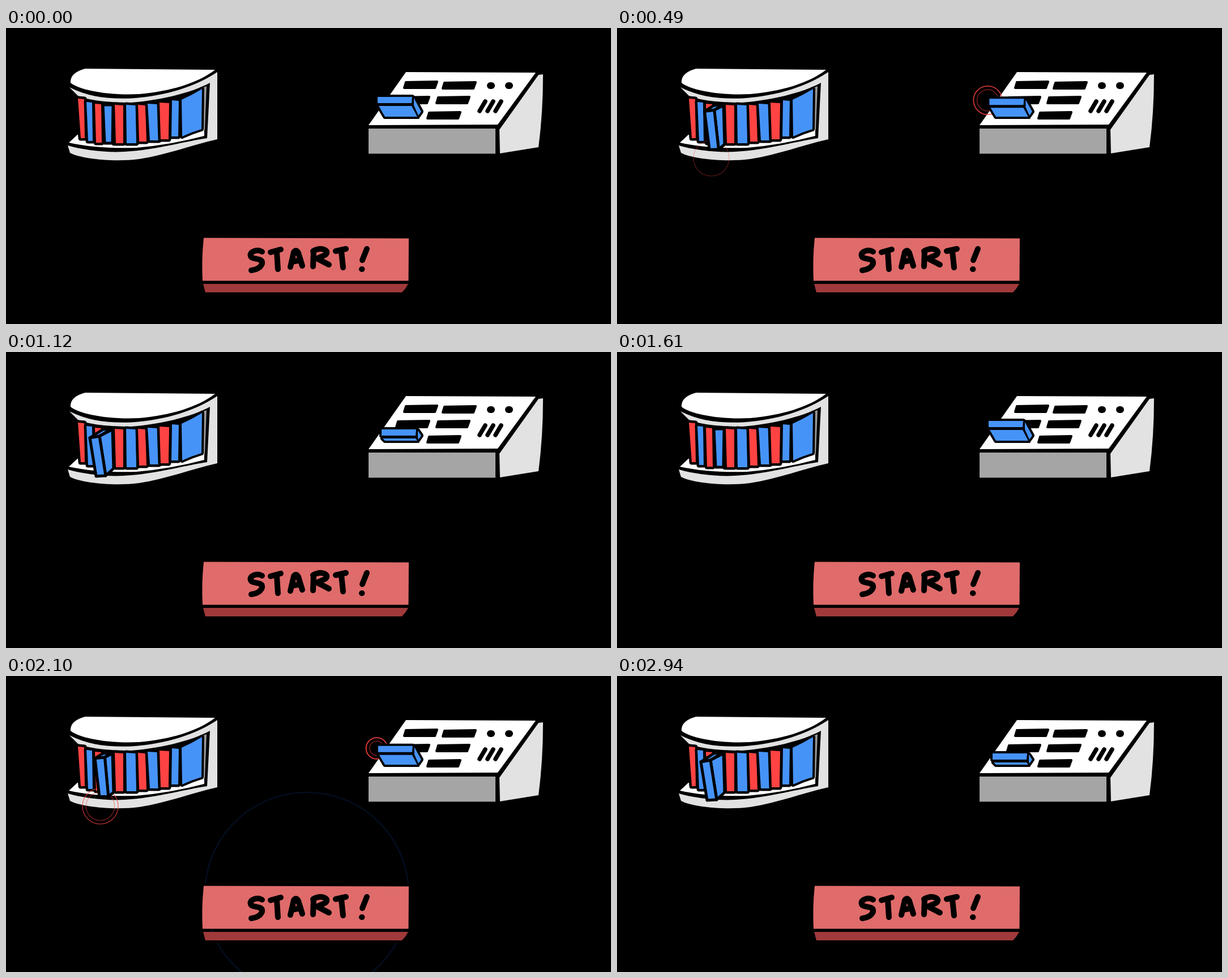
These frames come from a looping animation (1068x524 px, 2.97 s). An HTML page with a canvas:

```html
<!DOCTYPE html>
<html lang="en">
<head>
<meta charset="utf-8">
<title>Start</title>
<style>
html, body { margin: 0; width: 100%; height: 100%; overflow: hidden; background: #000; }
canvas { display: block; width: 100%; height: 100%; }
</style>
</head>
<body>
<canvas width="1068" height="524"></canvas>
<script>
const ctx = document.querySelector('canvas').getContext('2d');
const LOOP = 2970, STEP = 70, SECOND = 1610;
const RED = '#ff4343', BLUE = '#4693f8', GREY = '#e2e2e2';
ctx.lineJoin = ctx.lineCap = 'round';

const clamp = v => Math.max(0, Math.min(1, v));
const mix = (a, b, k) => a.map((v, i) => v + (b[i] - v) * k);

function fill(d, color) {
  ctx.fillStyle = color;
  ctx.fill(new Path2D(d));
}

function line(d, width, color = '#000') {
  ctx.strokeStyle = color;
  ctx.lineWidth = width;
  ctx.stroke(new Path2D(d));
}

function poly(points) {
  return 'M' + points.map(p => p.join()).join('L') + 'Z';
}

// An outline below the fill keeps the full coloured area visible.
function outlined(d, color, width) {
  line(d, width);
  fill(d, color);
}

function face(points, color) {
  const d = poly(points);
  fill(d, color);
  line(d, 5);
}

function ring(x, y, r, width, color, alpha = 1) {
  ctx.globalAlpha = alpha;
  ctx.strokeStyle = color;
  ctx.lineWidth = width;
  ctx.beginPath();
  ctx.arc(x, y, r, 0, 7);
  ctx.stroke();
  ctx.globalAlpha = 1;
}

function ripple(x, y, age) {
  for (const [lag, alpha] of [[0, 0.9], [70, 0.4]]) {
    const r = (age - lag) * 6.3 / 70;
    if (r > 0 && r < 33) ring(x, y, r, 0.9 + Math.sin(Math.PI * r / 33), RED, alpha);
  }
}

// top left x, top right x, bottom left x, bottom right x, top y, bottom y
const books = [
  [127, 138, 132, 139, 125, 195],
  [142, 152, 145, 153, 131, 200],
  [157, 168, 159, 169, 134, 203],
  null,
  [192, 207, 194, 207, 136, 204],
  [212, 229, 213, 230, 136, 204],
  [233, 246, 235, 248, 136, 201],
  [250, 267, 254, 270, 134, 199],
  [271, 288, 273, 287, 132, 197],
  [293, 305, 292, 304, 128, 192]
];

function cabinet() {
  fill('M140 72L369 74C338 98 290 112 235 117C178 120 128 109 114 97C113 84 124 76 140 72Z', '#fff');
  fill('M112 105C145 122 180 126 222 124.5C285 120 335 103 373 78L373 197C325 208 285 224 235 232' +
    'C190 238 130 231 113 221L109 208C140 217 185 222 222 218C270 214 305 203 355 195L360 97' +
    'C325 116 270 128 220 132C180 132 145 128 127 120Z', GREY);
  fill('M111 203L126 189L350 178L350 191Q290 207 230 212Q160 214 111 203Z', '#fff');
  fill('M349 105L354 103L351 180L349 180Z', '#999');
  books.forEach((b, i) => {
    if (!b) return;
    const [a, c, d, e, top, bottom] = b;
    outlined(poly([[a, top], [c, top + 1], [e, bottom], [d, bottom]]), i % 2 ? BLUE : RED, 9);
  });
  outlined('M310 127Q328 119 346 108L345 179Q328 184 311 192Z', BLUE, 8);
}

function pulledBook(k) {
  const tl = mix([171, 136], [148, 152], k), tr = mix([189, 136], [165, 149], k);
  const br = mix([188, 204], [176, 219], k), bl = mix([174, 204], [159, 220], k);
  face([tl, [171, 137], [187, 136], tr], BLUE);
  face([tr, [188, 137], [190, 206], br], BLUE);
  face([tl, tr, br, bl], BLUE);
}

function deck() {
  fill('M706 78L935 79L868 171L640 172Z', '#fff');
  fill('M640 178L864 178L864 222.5L640 222.5Z', '#a5a5a5');
  fill('M940 83L948 82Q948 150 940 211L872 222L871 180Z', GREY);
  for (const [x, y] of [[706, 94], [774, 95], [692, 121], [763, 121], [747, 148]])
    outlined(`M${x} ${y + 2}l55 -1l-4 11l-54 0Z`, '#000', 4);
  for (const x of [856, 888]) line(`M${x - 1} 102h2`, 12);
  for (const x of [846, 860, 874]) line(`M${x} 130l-10 17`, 7.5);
}

function cartridge(k) {
  const at = (x, y) => [x + 7 * k, y + 15 * k];
  const faces = [
    [at(656, 122), at(717, 122), at(716, 133), at(656, 133)],
    [at(658, 138), at(716, 138), [726, 157], [669, 157]],
    [at(720, 124), [733, 148], [728, 155], at(720, 137)]
  ].map(poly);
  faces.forEach(d => line(d, 8));
  faces.forEach(d => fill(d, BLUE));
  line('M669 159L728 159', 4);
}

const letters = [
  'M452 396C443 391 429 396 432 404C435 411 454 406 452 417C449 426 440 428 433 429',
  'M467 397L485 392M478 396L480 427',
  'M502 423L508 397Q512 391 516 398L523 421M504 414L520 411',
  'M543 395L542 422M542 395C558 386 573 395 563 402L549 408L570 419',
  'M582 395L600 391M592 395L595 424',
  'M637 391L629 411M628 427h.5'
];

function button(pressed) {
  ctx.save();
  if (pressed) ctx.translate(0, 4.5);
  line('M348 372L711 373L710 453L699 467L352 467L347 447Z', 10);
  fill('M349 371.5L711 372.5L710.5 447.5L347 447.5Q345 410 349 371.5Z', '#e06b6b');
  fill('M348 453L710 453Q706 461 699 468L352 468Z', '#a03a3a');
  letters.forEach(d => line(d, 10));
  ctx.restore();
}

function rays() {
  ctx.lineCap = 'butt';
  line('M467 317L486 328M494 286L505 305M532 278V301M574 289L563 307M597 318L578 329', 6.5, '#1a8cff');
  ctx.lineCap = 'round';
}

function draw(t) {
  const p = t < SECOND ? t + STEP : t - SECOND;
  const pressed = p >= 140 && p < 430;
  ctx.fillStyle = '#000';
  ctx.fillRect(0, 0, 1068, 524);

  if (p >= 210 && p < 560) {
    const v = (p - 210) / 140;
    ring(527 + v * 2, 384 + v, 36 + 36 * v * v, 2.6, '#030d1f');
  }
  cabinet();
  ripple(166.5, 230.5, p - 140);
  pulledBook(clamp((p - 100) / 640));
  deck();
  ripple(654.5, 128, p - 280);
  cartridge(clamp((p - 350) / 700) ** 1.3);
  if (pressed) rays();
  button(pressed);
}

const start = performance.now();
function tick() {
  const t = (performance.now() - start) % LOOP;
  draw(Math.floor(t / STEP) * STEP);
  requestAnimationFrame(tick);
}
tick();
</script>
</body>
</html>
```
